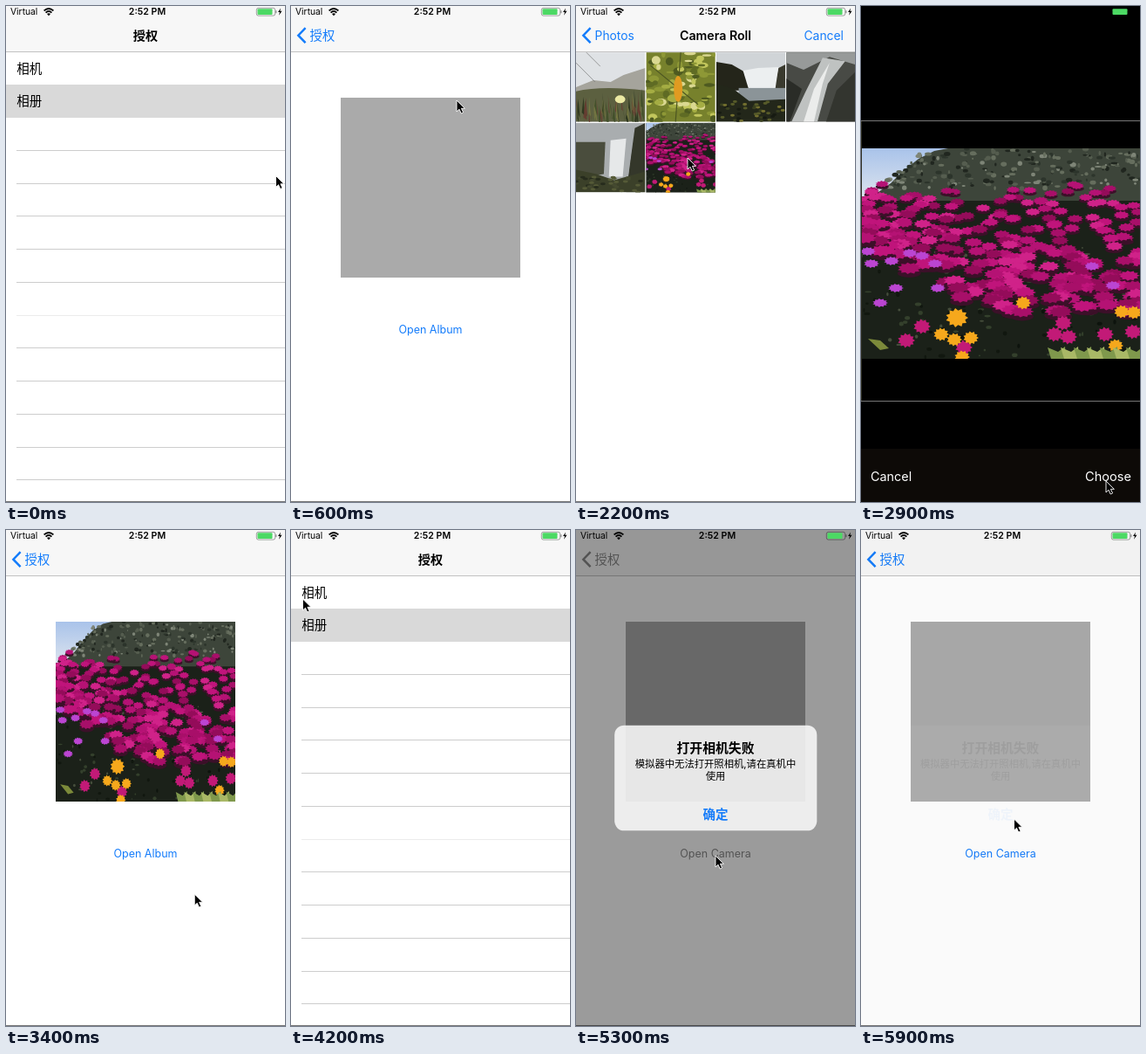
These frames come from a looping animation (320x568 px, 6000 ms). An HTML page:

```html
<!DOCTYPE html>
<html lang="zh">
<head>
<meta charset="utf-8">
<style>
  html, body { margin: 0; width: 100%; height: 100%; overflow: hidden; background: #fff; }
  svg { display: block; }
  #stage { width: 100vw; height: 100vh; --tint: #147cfb; }
  text { font-family: Inter, "Noto Sans CJK SC", "Noto Sans CJK JP", sans-serif; white-space: pre; }
  .tint { fill: var(--tint); }
  .tintLine { stroke: var(--tint); }
</style>
</head>
<body>
<svg id="stage" viewBox="0 0 320 568"></svg>
<script>
const W = 320, H = 568, LOOP = 6000, STEP = 100;
const BAR = 52, ROW = 37.73, FIRST_ROW = 52.3;

let seed = 11;
const rand = () => (seed = (seed * 16807) % 2147483647) / 2147483647;
const pick = list => list[Math.floor(rand() * list.length)];
const many = (n, make) => Array.from({ length: n }, (_, i) => make(i)).join('');

const rect = (x, y, w, h, fill, extra = '') =>
  `<rect x="${x}" y="${y}" width="${w}" height="${h}" fill="${fill}" ${extra}/>`;
const blob = (x, y, rx, ry, fill) =>
  `<ellipse cx="${x.toFixed(1)}" cy="${y.toFixed(1)}" rx="${rx.toFixed(1)}" ry="${ry.toFixed(1)}" fill="${fill}"/>`;
const shape = (d, fill) => `<path d="${d}" fill="${fill}"/>`;
const text = (s, x, y, size, extra = '') =>
  `<text x="${x}" y="${y}" font-size="${size}" ${extra}>${s}</text>`;
const group = (id, content) => `<g id="${id}">${content}</g>`;
const BOLD = 'font-weight="600"', MID = 'text-anchor="middle"', TINT = 'class="tint"';

// Pictures
function flower(x, y, r, color, flat = 1) {
  const spikes = many(22, i => {
    const a = i * Math.PI / 11, k = i % 2 ? r * 0.75 : r;
    return `${i ? 'L' : 'M'}${(x + k * Math.cos(a)).toFixed(1)} ${(y + k * flat * Math.sin(a)).toFixed(1)}`;
  });
  return shape(spikes + 'Z', color);
}

function bloomField() {
  const hedge = many(230, () => {
    const x = 30 + rand() * 290, top = Math.max(1, 40 - (x - 25) * 0.8);
    return blob(x, top + rand() * (46 - top), 1 + rand() * 3, 0.8 + rand() * 2,
      pick(['#555d4f', '#7e8577', '#20261f', '#2c342b', '#666e5e']));
  });
  const grass = many(150, () => blob(rand() * W, 105 + rand() * 135, 0.8 + rand() * 3, 0.8 + rand() * 2,
    pick(['#34402c', '#0d130d', '#454d3b', '#11170f'])));
  const blooms = many(270, i => {
    const x = rand() * W, depth = Math.pow(i / 270, 0.85), low = 104 + Math.min(x, 150) * 0.55;
    const y = 43 + depth * (low - 43) + rand() * 8 - 4;
    const size = 8 + depth * 6;
    const color = pick(['#c0147b', '#a80f69', '#d02289', '#b51274', '#940c5a']);
    return blob(x, y + size * 0.4, size * 0.95, size * 0.35, '#3c1029') + flower(x, y, size, color, 0.48);
  });
  const violet = [[12, 132], [40, 160], [88, 160], [56, 120], [22, 177], [85, 132], [8, 118], [35, 129], [70, 123], [265, 135], [289, 157]]
    .map(([x, y]) => flower(x, y, 9, '#bb45d2', 0.55)).join('');
  const near = [[52, 220], [70, 204], [222, 213], [238, 216], [232, 200], [280, 213], [312, 210], [118, 228]]
    .map(([x, y]) => flower(x, y, 10, '#c21a77', 0.85)).join('');
  const gold = [[110, 194], [92, 213], [107, 219], [126, 217], [186, 177], [299, 187], [313, 188], [292, 226], [116, 239]]
    .map(([x, y], i) => flower(x, y, i ? 9 : 13, '#f6a81c', 0.85)).join('');
  const leaves = many(7, i => shape(`M${218 + i * 15} 241l-4 -13 12 5 8 -6 1 14Z`, i % 2 ? '#a9b866' : '#7f984c'));
  return rect(0, 0, W, 241, '#1b2119') + rect(0, 0, 110, 55, 'url(#sky)')
    + shape('M20 50L34 40 48 26 66 12 84 3 100 0H320V60H20Z', '#3d453a') + hedge + grass
    + blooms + violet + near + gold + leaves
    + shape('M8 218l14 2 10 9 -10 2Z', '#7c8a3a');
}

const bloomPhoto = (x, y, w, h, fit = 'xMidYMid slice') =>
  `<svg x="${x}" y="${y}" width="${w}" height="${h}" viewBox="0 0 320 241" preserveAspectRatio="${fit}"><use href="#blooms"/></svg>`;

const scenes = [
  () => rect(0, 0, 80, 80, '#dfe2e5') + shape('M0 40L20 32 40 34 55 26 80 18V80H0Z', '#a5a49c')
    + shape('M0 45Q30 38 80 44V80H0Z', '#5c6040')
    + many(70, () => shape(`M${rand() * 80} ${60 + rand() * 20}l${rand() * 4 - 2} ${-8 - rand() * 12}l2 22Z`, pick(['#2f3820', '#757741', '#663d31', '#43502b'])))
    + '<path d="M0 12L22 34M12 0L28 16" stroke="#777" stroke-width=".7"/>' + blob(51, 54, 6, 4.5, '#ebe9a3'),
  () => rect(0, 0, 80, 80, '#77812c')
    + many(90, () => blob(rand() * 80, rand() * 80, 2 + rand() * 5, 1 + rand() * 4, pick(['#a5ad43', '#c2c65c', '#4e5a20', '#8e9836', '#dad891', '#5f6b24'])))
    + '<path d="M40 0L34 80M5 15L60 60" stroke="#4c5521" stroke-width="1.2" fill="none"/>'
    + blob(37, 42, 5, 15, '#e19b21'),
  () => rect(0, 0, 80, 80, '#d0d4d7') + shape('M0 11L18 14 32 22 40 44H0Z', '#24251a')
    + shape('M80 14L72 18 66 46H80Z', '#3a3a2e') + shape('M31 21L48 18 72 17 68 44H38Z', '#eceff0')
    + rect(26, 41, 54, 16, '#8b9498') + shape('M0 36L20 42 38 56 80 54V80H0Z', '#23271a')
    + many(40, () => blob(rand() * 78, 56 + rand() * 24, 2.5, 1.5, pick(['#575b29', '#171b12', '#74702f', '#3a401f']))),
  () => rect(0, 0, 80, 80, '#484a45') + shape('M0 0H80V14L50 5 20 20 0 12Z', '#979a99')
    + shape('M42 6L68 10 48 36 36 80H6L22 46Z', '#bfc2c1') + shape('M50 12L32 42 20 80 32 80 42 36Z', '#ebeceb')
    + shape('M80 22L58 44 46 80H80Z', '#33352f') + shape('M0 30L18 42 4 80H0Z', '#2a2c27'),
  () => rect(0, 0, 80, 80, '#a9adaf') + shape('M0 22L36 22 38 58 0 64Z', '#4a4d3d')
    + shape('M80 0L68 6 58 80H80Z', '#34372a') + shape('M34 20L66 14 60 64 32 62Z', '#a9adaf')
    + shape('M40 20L58 18 54 62 38 62Z', '#e6e8e9') + shape('M0 54L24 59 44 66 80 56V80H0Z', '#3b4029')
    + many(34, () => blob(rand() * 80, 62 + rand() * 18, 3, 1.5, pick(['#555a37', '#262b1c', '#454a30'])))
];

// Screen parts
const bar = rect(0, 0, W, BAR, '#f7f7f7') + rect(0, BAR, W, 1, '#c2c2c2');
const back = (label, size) =>
  '<path class="tintLine" d="M16.6 25.2L8.4 33.7 16.6 42.2" fill="none" stroke-width="2.5"/>'
  + text(label, 21.6, 39, size, TINT);
const title = s => text(s, 160, 39, 14.2, `${BOLD} ${MID}`);
const cancel = text('Cancel', 307, 38.8, 13.9, 'class="tint" text-anchor="end"');
const page = rect(0, 0, W, H, '#fff');

const listBody = page
  + many(13, i => rect(12, Math.floor(FIRST_ROW + ROW * (i + 1)), 308, 1, i === 7 ? '#ececec' : '#cdcdcd'))
  + rect(0, 90, W, 38, '#d9d9d9', 'id="selected"')
  + text('相机', 12.3, 76.5, 14.5) + text('相册', 12.3, 114.2, 14.5);

const detailBody = (label, picture = '') => page + rect(57, 105, 206, 206, '#aaa') + picture
  + text(label, 160, 375, 12.5, `class="tint" ${MID}`);

const albumRow = y => rect(9, y, 55, 1, '#333') + rect(7.5, y + 1.5, 58, 1, '#555') + bloomPhoto(6.5, y + 3, 60, 61)
  + `<path d="M301.5 ${y + 29}l5 5 -5 5" fill="none" stroke="#c4c4c8" stroke-width="1.8"/>`;
const photosBody = page + albumRow(56) + rect(0, 128, W, 1, '#d8d8d8') + albumRow(136)
  + text('Moments', 80, 93.5, 12.3) + text('Camera Roll', 80, 166, 12.5)
  + text('6', 80, 183.5, 12.5, 'fill="#888"') + text('My Albums', 6.8, 233.5, 14.2, BOLD);

const rollBody = page + scenes.map((draw, i) =>
  `<svg x="${(i % 4) * 80.4}" y="${53 + Math.floor(i / 4) * 80.7}" width="79.4" height="79.8" viewBox="0 0 80 80">${draw()}</svg>`).join('')
  + bloomPhoto(80.4, 133.7, 79.4, 80);

const cropPage = rect(0, 0, W, H, '#000') + bloomPhoto(0, 163, W, 241)
  + rect(0, 131, W, 1, '#777') + rect(0, 452, W, 1, '#777') + rect(0, 132, 1, 320, '#2c2c20')
  + rect(0, 507, W, 61, '#0d0a07')
  + text('Cancel', 11, 543.5, 14.4, 'fill="#fff"') + text('Choose', 310, 543.5, 14.6, 'fill="#fff" text-anchor="end"');

const statusBar = text('Virtual', 5, 10.3, 10.3) + text('2:52 PM', 162, 10.3, 10.6, `${BOLD} ${MID}`)
  + '<g fill="none" stroke="#000" stroke-width="1.9"><path d="M43.6 5.4Q49 0.6 54.4 5.4M45.6 7.6Q49 4.6 52.4 7.6"/></g>'
  + shape('M47 9Q49 7.3 51 9L49 11.2Z', '#000')
  + rect(287.3, 2.3, 21.4, 8.8, 'none', 'rx="2.2" stroke="#000" stroke-opacity=".45" stroke-width=".8"')
  + rect(288.5, 3.3, 17, 6.8, '#4cd964', 'rx="1"') + rect(309.3, 5.2, 1.1, 3, '#000', 'opacity=".45"')
  + shape('M315 2.5L312 7H314L313 10.7 316.5 5.8H314.3Z', '#000');

const alertBox = rect(44.5, 223.8, 231.5, 120.4, '#f8f8f8', 'rx="11" fill-opacity=".9"')
  + text('打开相机失败', 160, 255, 14.8, `${BOLD} ${MID}`)
  + text('模拟器中无法打开照相机,请在真机中', 160, 272, 11.3, MID) + text('使用', 160, 286, 11.3, MID)
  + text('确定', 160, 330.5, 14.5, `${BOLD} ${MID} fill="#147cfb"`);

const skyGradient = '<linearGradient id="sky" x2="0" y2="1"><stop stop-color="#a9c3ea"/><stop offset="1" stop-color="#dbe3ee"/></linearGradient>';

const stage = document.getElementById('stage');
stage.innerHTML = `<defs>${skyGradient}${group('blooms', bloomField())}</defs>`
  + group('listBody', listBody)
  + group('albumBody', detailBody('Open Album', group('chosen', bloomPhoto(57, 105, 206, 206, 'none'))))
  + group('cameraBody', detailBody('Open Camera'))
  + bar + group('listHead', title('授权'))
  + group('albumHead', back('授权', 14.3)) + group('cameraHead', back('授权', 14.3))
  + group('picker', group('photosBody', photosBody) + group('rollBody', rollBody) + bar
    + group('photosHead', title('Photos')) + group('rollHead', back('Photos', 13.8) + title('Camera Roll')) + cancel)
  + rect(0, 567, W, 1, '#777') + group('crop', cropPage)
  + rect(0, 0, W, H, '#000', 'id="dim"') + group('status', statusBar) + group('alert', alertBox)
  + group('cursor', '<path d="M0 0V13L3 10.2 5.2 15 7.6 13.9 5.4 9.3H9.4Z" fill="#000" stroke="#fff" stroke-width=".9"/>');

const parts = {};
stage.querySelectorAll('[id]').forEach(el => parts[el.id] = el);

// Motion
function settle(ms, rate = 16) {
  if (ms <= 0) return 0;
  const k = ms / 1000 * rate, p = 1 - (1 + k) * Math.exp(-k);
  return p > 0.985 ? 1 : p;
}
const place = (id, x, y) => parts[id].setAttribute('transform', `translate(${x.toFixed(2)} ${y.toFixed(2)})`);
const fade = (id, a) => parts[id].setAttribute('opacity', a.toFixed(3));
const show = (id, on) => parts[id].setAttribute('display', on ? 'inline' : 'none');

function enter(name, p) {
  show(name + 'Body', p > 0);
  place(name + 'Body', W * (1 - p), 0);
  place(name + 'Head', 130 * (1 - p), 0);
  fade(name + 'Head', p);
}
function recede(name, p) {
  place(name + 'Body', -W * 0.3 * p, 0);
  place(name + 'Head', -120 * p, 0);
  fade(name + 'Head', 1 - p);
}

const cursorPath = [
  [0, 309.5, 194.5], [100, 262, 134.5], [200, 262, 134.5], [300, 190, 108], [700, 190, 108],
  [800, 166, 300], [900, 158, 370], [1200, 158, 370], [1500, 130, 182], [1700, 128, 180],
  [2200, 128, 174], [2400, 128, 174], [2900, 281, 544], [3300, 281, 544], [3700, 22, 36],
  [4000, 20, 40], [4200, 13.5, 79], [4300, 16, 74], [4500, 16, 74], [5000, 160, 373],
  [5300, 160, 373], [5600, 166, 327], [5700, 168, 327], [5900, 175.5, 331]
];
function cursorAt(t) {
  const i = cursorPath.findIndex(k => k[0] > t);
  if (i < 0) return cursorPath[cursorPath.length - 1].slice(1);
  const [t0, x0, y0] = cursorPath[i - 1], [t1, x1, y1] = cursorPath[i];
  const p = (t - t0) / (t1 - t0);
  return [x0 + (x1 - x0) * p, y0 + (y1 - y0) * p];
}

function draw(t) {
  const album = settle(t - 200) - settle(t - 3720);
  const camera = settle(t - 4350);
  enter('album', album);
  enter('camera', camera);
  recede('list', Math.max(album, camera));
  parts.selected.setAttribute('y', t < 4350 ? 90 : 53);
  show('chosen', t >= 3000);

  const lift = H * (1 - settle(t - 900, 19.3) + settle(t - 3000));
  show('picker', lift < H);
  place('picker', 0, lift);
  const roll = settle(t - 1580);
  enter('roll', roll);
  recede('photos', roll);
  const crop = settle(t - 2280);
  show('crop', crop > 0 && lift < H);
  place('crop', W * (1 - crop), lift);

  const rise = settle(t - 5020, 22), alpha = rise * (1 - settle(t - 5700, 24));
  const scale = 1 + 0.18 * (1 - rise);
  fade('dim', 0.4 * alpha);
  fade('alert', alpha);
  parts.alert.setAttribute('transform', `translate(160 284) scale(${scale}) translate(-160 -284)`);
  stage.style.setProperty('--tint', t > 5020 && t < 5750 ? '#888' : '#147cfb');

  place('cursor', ...cursorAt(t));
}

const start = performance.now();
function tick() {
  const t = (performance.now() - start) % LOOP;
  draw(Math.floor(t / STEP) * STEP);
  requestAnimationFrame(tick);
}
tick();
</script>
</body>
</html>
```
